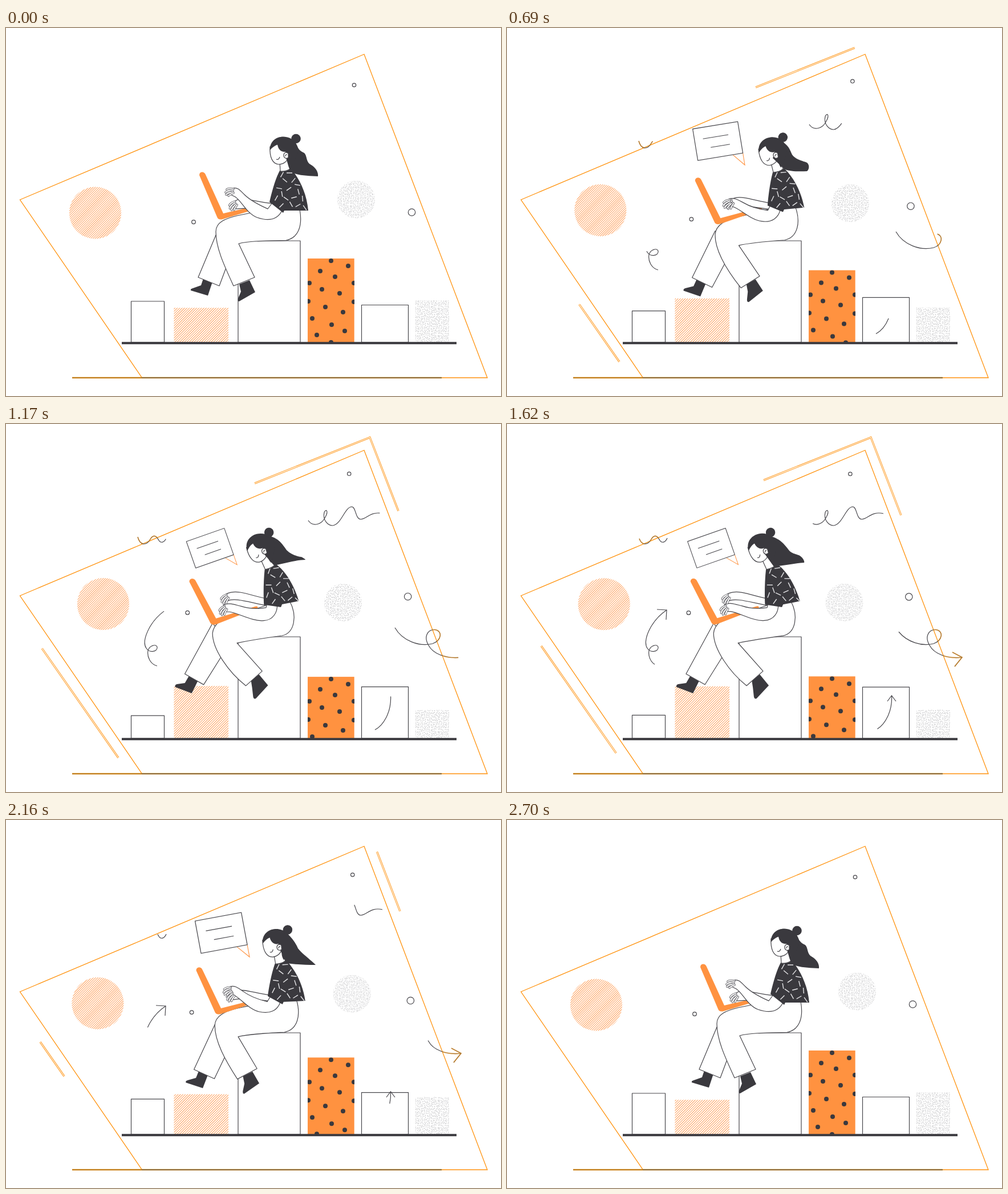
Write an HTML page that moves like this. It is 868 px wide and 645 px high and loops after 2.73 s.

```html
<!DOCTYPE html>
<html lang="en">
<head>
<meta charset="utf-8">
<title>Working on the chart</title>
<style>
html, body { margin: 0; width: 100%; height: 100%; overflow: hidden; background: #fff; }
svg { display: block; width: 100vw; height: 100vh; }
.line { fill: none; stroke: #48474c; stroke-width: 1.2; }
.skin { fill: #fff; stroke: #48474c; stroke-width: 1.2; stroke-linejoin: round; }
.ink { fill: #3a393e; }
.orange { fill: #ff9240; }
.edge { fill: none; stroke: #ff930f; stroke-width: 1.3; }
.thin { fill: none; stroke: #ff9240; stroke-width: 1.1; }
</style>
</head>
<body>
<svg id="stage" viewBox="0 0 868 645">
  <defs>
    <pattern id="hatch" width="3" height="3" patternUnits="userSpaceOnUse" patternTransform="rotate(45)">
      <path d="M1.5,0V3" stroke="#ff9a50" stroke-width="1"/>
    </pattern>
    <pattern id="fineHatch" width="2.75" height="2.75" patternUnits="userSpaceOnUse" patternTransform="rotate(45)">
      <path d="M1.4,0V2.75" stroke="#ff9a50" stroke-width="1"/>
    </pattern>
    <pattern id="stipple" width="48" height="48" patternUnits="userSpaceOnUse"></pattern>
    <clipPath id="outside"><path clip-rule="evenodd" d="M0,0H868V645H0ZM25,301L628,46L844,613H238Z"/></clipPath>
    <clipPath id="barClip"><rect id="barMask" x="529" width="82"/></clipPath>
    <clipPath id="shirtClip"><path id="shirtMask"/></clipPath>
  </defs>

  <path class="edge" d="M24.5,301L628,46L844,613H238.5Z"/>
  <path d="M116,613H764" stroke="#f59a1c" stroke-width="2.6"/>
  <path d="M116,613H238" stroke="#8a6420" stroke-width="1.1"/>
  <path d="M238,613H764" stroke="#6b5c44" stroke-width="1.4"/>

  <g id="hatchDisc"><circle r="45.5" fill="url(#fineHatch)"/></g>
  <g id="dotDisc"><circle r="33" fill="url(#stipple)"/></g>
  <g id="rings" class="line"></g>
  <g id="frames"></g>

  <g id="bars"></g>
  <g id="spots" clip-path="url(#barClip)" class="ink"></g>
  <rect class="skin" x="407" y="373" width="109" height="178"/>
  <path d="M203,552.3H790" stroke="#3b3a3f" stroke-width="4"/>

  <g id="squiggles"></g>
  <g clip-path="url(#outside)" id="glow" fill="none" stroke="#ff9a10" stroke-width="2" opacity=".5"></g>

  <g id="bubble">
    <path class="thin" d="M-18,-21L0,0V-21"/>
    <rect class="skin" x="-80" y="-77" width="80" height="56"/>
    <path class="line" d="M-65,-57H-20M-54,-40H-20"/>
  </g>

  <g id="figure"></g>
  <g id="dashes" clip-path="url(#shirtClip)"><g id="dashSet" stroke="#e6e6e8" stroke-width="1.4"></g></g>
  <path id="neck" class="skin"/>
  <g id="face">
    <path class="skin" d="M463,208C462,226 467,238 478,239C488,239 494,232 495,226L490,200Z"/>
    <path class="line" d="M474,230Q478,232 480,226"/>
  </g>
  <path id="tail" class="ink"/>
  <g id="hair">
    <path class="ink" d="M463,214C462,199 474,190 487,190.5C502,191 511,202 513,214C510,225 503,240 497,246C494,240 494,236 495,229L490,217C482,218 477,212 476,204C472,206 467,209 463,214Z"/>
    <circle class="ink" cx="508.5" cy="194" r="8.3"/>
    <path class="skin" d="M495,220C491,216 487,219 487,223C487,228 492,230 495,227Z"/>
    <path class="line" d="M493,222Q490,221 490,225"/>
  </g>
</svg>
<script>
const LOOP = 2730, HALF = LOOP / 2, FRAME = 30;
const $ = id => document.getElementById(id);
const lerp = (a, b, k) => a + (b - a) * k;
const clamp = x => Math.max(0, Math.min(1, x));

function add(parent, tag, attrs) {
  const el = document.createElementNS('http://www.w3.org/2000/svg', tag);
  set(el, attrs);
  return parent.appendChild(el);
}
function set(el, attrs) {
  for (const k in attrs) el.setAttribute(k, attrs[k]);
}

// Blend two path strings that share the same commands
function mix(a, b, k) {
  const to = b.match(/-?[\d.]+/g);
  let i = 0;
  return a.replace(/-?[\d.]+/g, n => lerp(+n, +to[i++], k).toFixed(2));
}

// cubic-bezier(.6, 0, .4, 1)
function ease(x) {
  let lo = 0, hi = 1, s = .5;
  for (let i = 0; i < 22; i++) {
    s = (lo + hi) / 2;
    const v = 1 - s;
    if (1.8 * s * v * v + 1.2 * s * s * v + s * s * s < x) lo = s; else hi = s;
  }
  return s * s * (3 - 2 * s);
}
const lean = t => ease(t < HALF ? t / HALF : (LOOP - t) / HALF);

function segment(keys, t) {
  let i = 0;
  while (i < keys.length - 2 && t >= keys[i + 1][0]) i++;
  return [keys[i], keys[i + 1]];
}

// Stipple texture
let seed = 7;
const rand = () => (seed = seed * 16807 % 2147483647) / 2147483647;
for (let y = 0; y < 48; y += 3)
  for (let x = 0; x < 48; x += 3)
    add($('stipple'), 'rect', { x: x + rand() * 1.8, y: y + rand() * 1.8, width: 1.1, height: 1.1, fill: '#a2a2a5' });

// Floating rings: x, y, x2, y2, r
const rings = [[610.5, 100, 601.5, 87, 3.2], [329, 340, 318, 330.5, 3.3], [711.5, 323, 704.5, 302, 6.2]]
  .map(pos => ({ pos, el: add($('rings'), 'circle', { r: pos[4] }) }));

// Bars: x, width, top, top2, class, fill
const bars = [
  [219.5, 58, 479, 511.8, 'skin'],
  [294.5, 95.5, 490.5, 458.5, '', 'url(#hatch)'],
  [529, 81.7, 404, 444, 'orange'],
  [623.5, 82, 485.5, 460, 'skin'],
  [718, 59, 478, 502, '', 'url(#stipple)']
].map(([x, width, a, b, cls, fill]) => {
  const el = add($('bars'), 'rect', { x, width, class: cls });
  if (fill) el.setAttribute('fill', fill);
  return { el, a, b };
});

const spots = add($('spots'), 'g', {});
[[570, 4], [600, 13], [551, 22], [577, 32], [532, 43], [610, 43], [554, 54], [585, 61], [530, 75], [610, 76],
 [560, 85], [591, 94], [537, 105], [571, 116], [594, 127], [545, 134], [570, 147]]
  .forEach(([cx, cy]) => add(spots, 'circle', { cx, cy, r: 4 }));

// Lines that draw on, then wipe off
const trims = [];
function trimmed(parent, d, attrs) {
  trims.push(add(parent, 'path', { d, pathLength: 1, ...attrs }));
}
['M436,104L638,23.5L691,160', 'M197,585L60,389'].forEach(d => {
  trimmed($('frames'), d, { fill: 'none', stroke: '#ff9a20', 'stroke-width': 3.2 });
  trimmed($('frames'), d, { fill: 'none', stroke: '#fff', 'stroke-width': 1.2 });
});
[
  'M530,169C537,180 553,178 560,163C566,152 561,148 558,155C555,168 564,178 573,178C588,176 594,146 606,145C614,145 612,166 622,167C632,167 640,152 660,157',
  'M231,198C235,213 246,214 253,202C260,190 266,200 268,204C272,210 278,207 281,200',
  'M265,424C253,421 247,408 249,397C252,388 263,385 265,391C266,399 252,402 246,393C237,380 252,345 280,326',
  'M682,357C695,380 725,391 748,385C764,380 766,362 752,360.5C739,360 732,373 741,388C749,403 772,412 798,409',
  'M647,536C662,528 676,505 674.5,476'
].forEach(d => {
  trimmed($('squiggles'), d, { class: 'line' });
  trimmed($('glow'), d, {});
});

// Arrowheads: arm, tip, arm
const heads = [[263, 325, 280, 326, 279, 343], [781, 400, 798, 409, 785, 425], [667, 486, 674.5, 476, 682, 486]]
  .map(pos => ({ pos, els: [add($('squiggles'), 'path', { class: 'line' }), add($('glow'), 'path', {})] }));

// Body parts, back to front: class, upright pose, leaning pose
const parts = [
  ['ink', 'M346,439L362,445L354,469L324,460Q323,457 328,456L342,451Z',
          'M320,442L337,448L325,472L296,461Q295,457 299,456L313,454Z'],
  ['skin', 'M368,363L337,437L374,452L386,420L400,380Z',
           'M362,349L313,438L346,457L377,408L390,380Z'],
  ['ink', 'M409,449L427,442L437,463L409,479Q406,480 407,474L412,462Z',
          'M430,449L444,439L460,458L439,481Q435,483 434,478L432,462Z'],
  ['skin', 'M515,318C520,345 514,368 490,372.5C455,373 425,373 408,378L436,437L399,452C382,415 368,385 368,357C368,340 385,334 405,329C425,325 450,320 470,315Z',
           'M497,310C511,336 506,366 484,371C455,375 425,380 405,384L449.5,433L421,459C390,435 362,395 362,367C364,348 385,338 405,333C425,328 440,325 460,316Z'],
  ['orange', 'M339,258Q339,253 344,252.5Q348,252.5 350,257L381,325L450,309Q454,309 453,313L380,335Q372,337 370,331Z',
             'M321,277Q321,272 326,271.5Q330,271.5 332,275L368,341L437,320Q442,319 441,323L369,351Q361,354 358,349Z'],
  ['skin', 'M470,308C440,305 422,298 409,300Q401,302 397,309L404,317C420,316 440,314 470,318Z',
           'M462,307C435,303 412,291 394,295Q384,297 381,303L388,310C402,303 430,314 462,319Z'],
  ['skin', 'M397,281C406,278 411,285 418,292C430,304 448,312 459,317L468,305L484,320C476,336 460,339 440,332C422,325 413,303 402,296L394,292Z',
           'M381,318C390,313 402,318 412,320C428,325 445,324 456,322L458,312L475,315C477,330 468,344 452,345C433,347 407,332 392,330L380,330Z'],
  ['ink', 'M480,250L499,246C510,258 527,285 530,320L488,320L486,324L462,305C466,288 472,265 480,250Z',
          'M453,255L473,246C488,256 504,280 513,310L484,316L482,321L452,317C451,300 451,275 453,255Z']
].map(([cls, a, b]) => ({ a, b, el: add($('figure'), 'path', { class: cls }) }));
const shirt = parts[parts.length - 1];
const neck = { el: $('neck'), a: 'M480,234L481,251Q491,252 498,247L496,232', b: 'M447,240L454,255Q465,253 471,247L464,234' };

// Hands: x, y, angle at both poses
const hands = [[401, 309, -30, 386, 304, -34], [396, 286, 0, 383, 325, -36]].map(pos => {
  const g = add($('figure'), 'g', { 'stroke-linecap': 'round', fill: 'none' });
  ['M3,-4Q-5,-6 -9,-3', 'M2,-2Q-8,-2 -11,2', 'M2,1Q-5,2 -10,6', 'M3,3Q-1,4 -6,8'].forEach(d => {
    add(g, 'path', { d, stroke: '#55545a', 'stroke-width': 3.6 });
    add(g, 'path', { d, stroke: '#fff', 'stroke-width': 2 });
  });
  return { pos, g };
});

[[497, 254, 0], [489, 267, 40], [504, 267, -50], [511, 275, 10], [479, 281, 10], [496, 282, -35], [484, 291, 80],
 [513, 287, 75], [474, 298, -60], [491, 299, 35], [505, 297, -15], [520, 299, 85], [483, 311, -45], [500, 309, 60],
 [512, 311, -30], [524, 315, 55], [484, 257, -60]]
  .forEach(([x, y, r]) => add($('dashSet'), 'path', { d: 'M-5,0H5', transform: `translate(${x},${y}) rotate(${r})` }));

const tails = [
  [0, 'M508,202C512,212 516,216 523,219C528,224 526,232 532,238C541,243 548,250 547,260C530,259 505,259 498,250L490,225Z'],
  [450, 'M498,200C504,206 509,214 513,222C517,230 526,233 532,236C541,241 542,250 533,257C520,257 503,254 494,249L482,222Z'],
  [690, 'M478,198C492,203 495,210 500,222C506,231 520,233 526,236C531,240 530,248 526,251C510,252 492,251 486,247L466,228Z'],
  [1170, 'M458,195C478,200 483,208 492,221C500,229 510,232 518,233C522,235 525,237 525,238C510,238 490,244 470,248L450,225Z'],
  [1620, 'M459,196C478,200 486,210 495,222C502,229 511,228 515,232C520,236 522,241 521,243C505,244 488,248 468,250L450,225Z'],
  [2160, 'M492,198C500,205 508,215 512,225C519,234 528,240 533,245C538,249 541,252 543,254C525,254 505,253 492,251L478,222Z']
];
tails.push([LOOP, tails[0][1]]);

// Bubble: time from either end, tip x, tip y, scale, angle, opacity
const pops = [
  [390, 435, 241, .3, -23, 0], [450, 433, 241, .62, -18, .6], [570, 427, 240, 1.03, -10.5, 1], [690, 417, 240, 1, -9.3, 1],
  [900, 410, 243, .94, -14.5, 1], [1110, 405.5, 246.5, .88, -19.3, 1], [HALF, 404.2, 247, .88, -19.6, 1]
];

function drawTail(t, p) {
  const [a, b] = segment(tails, t);
  const pa = lean(a[0]), pb = lean(b[0]);
  const k = Math.abs(pb - pa) < .1 ? (t - a[0]) / (b[0] - a[0]) : (p - pa) / (pb - pa);
  $('tail').setAttribute('d', mix(a[1], b[1], clamp(k)));
}

function drawBubble(t) {
  const u = Math.min(t, LOOP - t), [a, b] = segment(pops, u);
  const k = clamp((u - a[0]) / (b[0] - a[0]));
  const [, x, y, s, r, o] = a.map((v, i) => lerp(v, b[i], k));
  set($('bubble'), { transform: `translate(${x},${y}) rotate(${r}) scale(${s})`, opacity: o });
}

function drawLines(t, p) {
  const from = t < HALF ? 0 : 1 - p, to = t < HALF ? p : 1;
  const on = to - from > .004;
  trims.forEach(el => set(el, {
    'stroke-dasharray': `${to - from} 2`, 'stroke-dashoffset': -from, visibility: on ? 'visible' : 'hidden'
  }));
  const k = clamp((t - 1170) / 200) * clamp((2600 - t) / 200);
  heads.forEach(({ pos: [ax, ay, x, y, bx, by], els }) => els.forEach(el => set(el, {
    d: `M${lerp(x, ax, k)},${lerp(y, ay, k)}L${x},${y}L${lerp(x, bx, k)},${lerp(y, by, k)}`,
    visibility: k > 0 ? 'visible' : 'hidden'
  })));
}

function draw(t) {
  const p = lean(t);
  const move = (x, y, x2, y2) => `translate(${lerp(x, x2, p)},${lerp(y, y2, p)})`;

  set($('hatchDisc'), { transform: move(156.5, 324, 170.8, 315.3) });
  set($('dotDisc'), { transform: move(614, 300.5, 590.5, 313.3) });
  rings.forEach(({ pos: [x, y, x2, y2], el }) => set(el, { transform: move(x, y, x2, y2) }));

  bars.forEach(({ el, a, b }) => {
    const y = lerp(a, b, p);
    set(el, { y, height: 551 - y });
  });
  const top = lerp(404, 444, p);
  set($('barMask'), { y: top, height: 551 - top });
  set(spots, { transform: `translate(0,${top})` });

  [...parts, neck].forEach(({ el, a, b }) => el.setAttribute('d', mix(a, b, p)));
  $('shirtMask').setAttribute('d', mix(shirt.a, shirt.b, p));
  set($('dashSet'), { transform: `${move(0, 0, -18, -2)} rotate(${-10 * p},497,288)` });
  hands.forEach(({ pos: [x, y, r, x2, y2, r2], g }) =>
    set(g, { transform: `${move(x, y, x2, y2)} rotate(${lerp(r, r2, p)})` }));
  const head = `${move(0, 0, -39.6, 3.5)} rotate(${-17 * p},479,220)`;
  set($('face'), { transform: head });
  set($('hair'), { transform: head });

  drawTail(t, p);
  drawBubble(t);
  drawLines(t, p);
}

const start = performance.now();
function tick() {
  const t = (performance.now() - start) % LOOP;
  draw(Math.floor(t / FRAME) * FRAME);
  requestAnimationFrame(tick);
}
tick();
</script>
</body>
</html>
```
